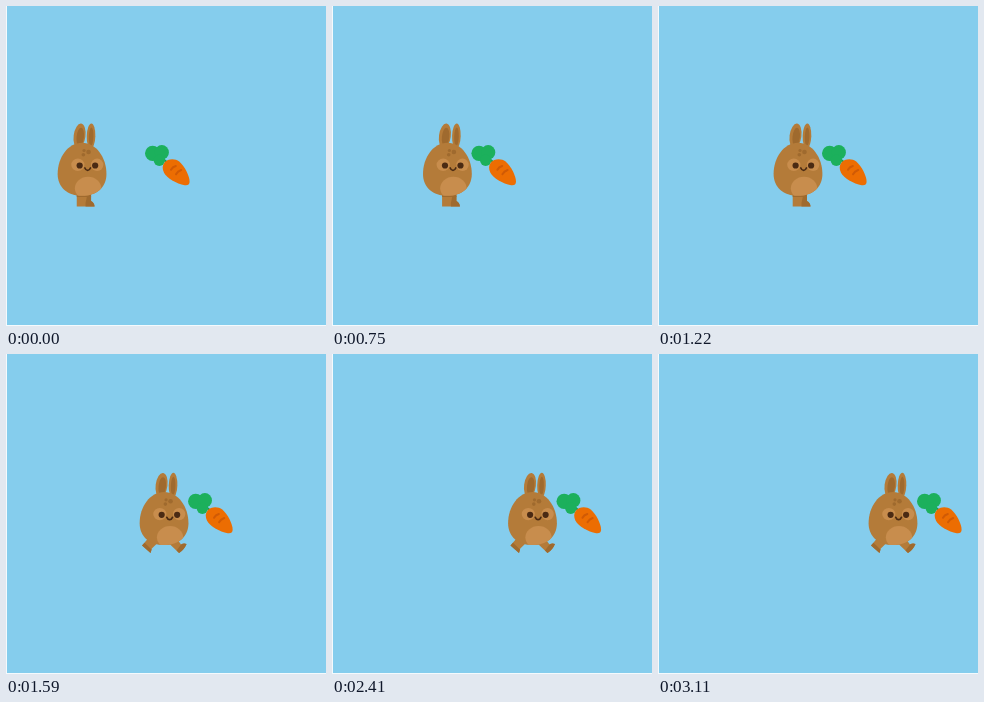
Animation, 320 px wide and 320 px high, one loop 3.21 s. Source, as an HTML page with a canvas:

```html
<!DOCTYPE html>
<html lang="en">
<head>
<meta charset="utf-8">
<title>Bunny and carrot</title>
<style>
html, body { margin: 0; width: 100%; height: 100%; overflow: hidden; background: #85cded; }
canvas { display: block; width: 320px; height: 320px; }
</style>
</head>
<body>
<canvas id="stage" width="320" height="320"></canvas>
<script>
const canvas = document.getElementById('stage');
const ctx = canvas.getContext('2d');
const ratio = window.devicePixelRatio || 1;
canvas.width = canvas.height = Math.round(320 * ratio);

const LOOP = 3210;
const STRIDE = LOOP / 6;
const PUSH_AT = 39; // distance walked before the carrot starts to move

const SKY = '#85cded', EDGE = '#f4fafd';
const FUR = '#b47b39', DARK_FUR = '#9f6a2e', LIGHT_FUR = '#c88d4d', EYE = '#4a2a13';
const LEAF = '#1cb05c', STEM = '#1a9b50', ORANGE = '#ec6d02', RIDGE = '#d05a05';

// [time, distance] pairs of the walk
const WALK = [[0, 0], [1220, 64], [1250, 64], [1590, 82], [2030, 105.6], [2780, 142.8], [3110, 159], [LOOP, 159]];

function walked(t) {
  const i = Math.max(1, WALK.findIndex(p => p[0] > t));
  const [t0, d0] = WALK[i - 1], [t1, d1] = WALK[i];
  return d0 + (d1 - d0) * (t - t0) / (t1 - t0);
}

function oval(x, y, rx, ry, color, turn = 0) {
  ctx.fillStyle = color;
  ctx.beginPath();
  ctx.ellipse(x, y, rx, ry, turn, 0, Math.PI * 2);
  ctx.fill();
}

function shape(d, color) {
  ctx.fillStyle = color;
  ctx.fill(new Path2D(d));
}

function line(d, color, width) {
  ctx.strokeStyle = color;
  ctx.lineWidth = width;
  ctx.lineCap = 'round';
  ctx.stroke(new Path2D(d));
}

function standingLegs() {
  shape('M70.7 186H85V195Q88.3 196.5 88.5 200.5H70.7Z', FUR);
  shape('M81 190H85V195Q88.3 196.5 88.5 200.5H79.5V197Z', DARK_FUR);
  shape('M70.7 188.5H85V191H70.7Z', DARK_FUR);
}

function stridingLegs() {
  shape('M60 184.5L54 191.5L62.5 199L63.8 194.5L69.5 189Z', FUR);
  shape('M54 191.5L62.5 199L63.5 195.5L56.5 188.8Z', DARK_FUR);
  shape('M81 189.5L91 199Q96 196 98.5 190Q95.5 189 93 190.5L89 185Z', FUR);
  shape('M91 199Q96 196 98.5 190Q95.5 189 93 190.5L88.5 196.5Z', DARK_FUR);
}

function bunny(striding) {
  if (striding) stridingLegs(); else standingLegs();
  ctx.save();
  if (striding) ctx.translate(0, 1.3);

  oval(73.5, 130, 5.9, 12.5, FUR, 0.13);
  oval(74.2, 131, 3.7, 9.2, DARK_FUR, 0.1);
  oval(85, 130, 4.3, 12.5, FUR, 0.03);
  oval(85.1, 130.7, 2.3, 9.2, DARK_FUR, 0.03);

  const body = 'M76 136.8C90 136.8 100.4 151.5 100.4 168C100.4 181.5 90.5 189.8 76 189.8C61.5 189.8 51.6 181.5 51.6 168C51.6 151.5 62 136.8 76 136.8Z';
  shape(body, FUR);
  ctx.save();
  ctx.clip(new Path2D(body));
  oval(82, 182.3, 13.2, 11.5, LIGHT_FUR);
  ctx.restore();

  for (const [x, y, r] of [[78, 144.5, 1.6], [82.5, 146, 2.3], [77.3, 148.8, 1.8]]) oval(x, y, r, r, DARK_FUR);

  oval(71.8, 158.8, 6.6, 6.2, LIGHT_FUR);
  oval(91.1, 158.8, 6.2, 6.2, LIGHT_FUR);
  oval(73.6, 159.5, 3.1, 3.1, EYE);
  oval(89.1, 159.5, 3.1, 3.1, EYE);
  line('M78.8 162Q79.8 164.4 81.6 164.4Q83.4 164.4 84.4 162', EYE, 1.7);
  ctx.restore();
}

function carrot() {
  line('M157 153L162.5 157.5', STEM, 2.2);
  oval(146.6, 147.3, 7.6, 7.6, LEAF);
  oval(155.8, 146.4, 7.1, 7.3, LEAF);
  oval(153.3, 154.2, 5.7, 5.7, LEAF);
  shape('M158.3 156.8C161.8 152.5 169 152.3 173.2 155.6C178.5 160 183.6 170 183.6 175.8C183.6 178.8 181.5 179.6 178.7 179.2C170.5 178 160.8 171.8 158 166.7C156.2 163 156.2 159.6 158.3 156.8Z', ORANGE);
  line('M165 163.8Q166.5 160.8 169.8 160', RIDGE, 2);
  line('M170 168.2Q171.8 165 175.2 164', RIDGE, 2);
}

function at(x, draw) {
  ctx.save();
  ctx.translate(x, 0);
  draw();
  ctx.restore();
}

function render(t) {
  ctx.setTransform(ratio, 0, 0, ratio, 0, 0);
  ctx.fillStyle = EDGE;
  ctx.fillRect(0, 0, 320, 320);
  ctx.fillStyle = SKY;
  ctx.fillRect(1, 0, 319, 319);

  const d = walked(t);
  const striding = t % STRIDE >= STRIDE / 2;
  at(Math.max(0, d - PUSH_AT), carrot);
  at(d, () => bunny(striding));
}

const start = performance.now();
function tick() {
  render((performance.now() - start) % LOOP);
  requestAnimationFrame(tick);
}
tick();
</script>
</body>
</html>
```
